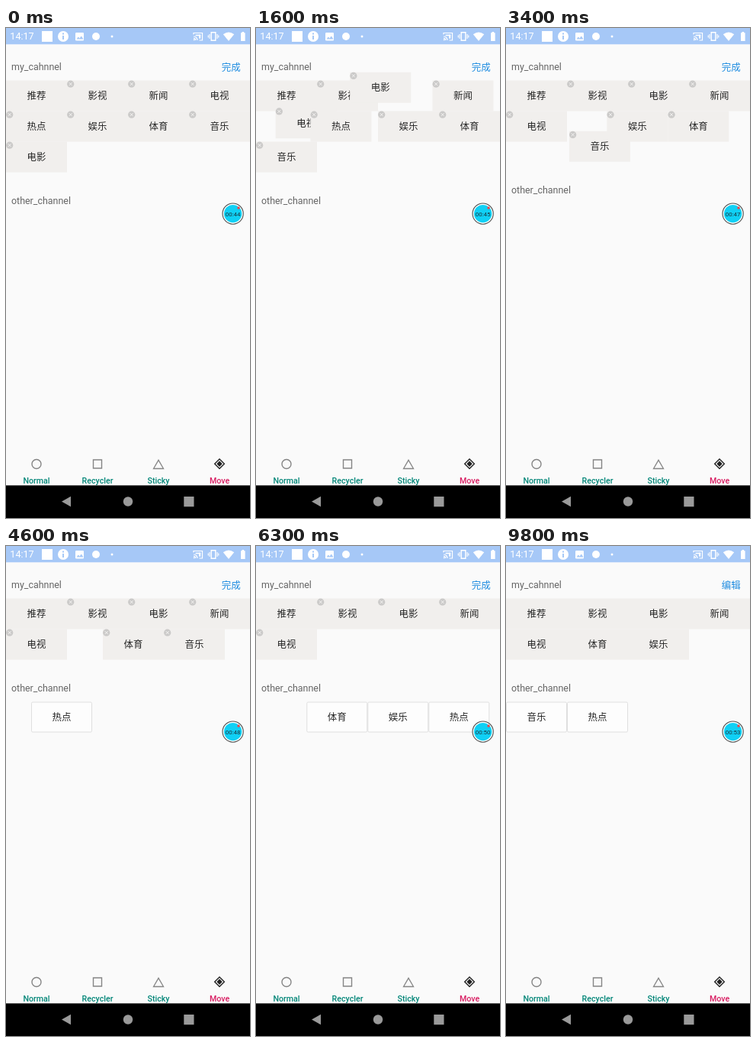
Animation of 320x640 px, one loop 9.9 s. Source, as an HTML page with a canvas:

```html
<!DOCTYPE html>
<html lang="zh-CN">
<head>
<meta charset="utf-8">
<title>Channel editor</title>
<style>
html, body { margin: 0; width: 100%; height: 100%; overflow: hidden; background: #fafafa; }
canvas { display: block; width: 320px; height: 640px; }
</style>
</head>
<body>
<canvas id="stage"></canvas>
<script>
const LOOP = 9900, MOVE = 250, FADE_IN = 120, FADE_OUT = 90, EDIT_END = 9500;
const CELL_W = 80, CELL_H = 40, GRID_TOP = 68.5;
const LATIN = 'Roboto, sans-serif';
const HAN = '"Noto Sans CJK SC", "Noto Sans CJK", sans-serif';

const canvas = document.getElementById('stage');
const ctx = canvas.getContext('2d');
const ratio = window.devicePixelRatio || 1;
canvas.width = 320 * ratio;
canvas.height = 640 * ratio;

// Each layout begins its slide at the given time.
const layouts = [
  [0, '推荐 影视 新闻 电视 热点 娱乐 体育 音乐 电影', ''],
  [738, '推荐 影视 新闻 电视 热点 电影 娱乐 体育 音乐', ''],
  [1404, '推荐 影视 电影 新闻 电视 热点 娱乐 体育 音乐', ''],
  [3301, '推荐 影视 电影 新闻 电视 娱乐 体育 音乐', '热点'],
  [4490, '推荐 影视 电影 新闻 电视 体育 音乐', '娱乐 热点'],
  [5400, '推荐 影视 电影 新闻 电视 音乐', '体育 娱乐 热点'],
  [6119, '推荐 影视 电影 新闻 电视', '音乐 体育 娱乐 热点'],
  [7700, '推荐 影视 电影 新闻 电视 体育', '音乐 娱乐 热点'],
  [8400, '推荐 影视 电影 新闻 电视 体育 娱乐', '音乐 热点']
].map(([at, mine, other]) => {
  const names = mine.split(' ');
  const rows = Math.ceil(names.length / 4);
  const cells = new Map();
  const place = (list, isMine, top) => list.forEach((name, i) =>
    cells.set(name, { isMine, x: i % 4 * CELL_W, y: top + Math.floor(i / 4) * CELL_H }));
  place(names, true, GRID_TOP);
  place(other.split(' ').filter(Boolean), false, 123.5 + rows * CELL_H);
  return { at, cells, labelY: 106 + rows * CELL_H };
});

const drag = { name: '电影', start: 100, release: 1550, end: 1800,
  from: { x: 0, y: 148.5 }, to: { x: 119.1, y: 56.5 }, home: { x: 160, y: GRID_TOP } };

const clamp = v => Math.max(0, Math.min(1, v));
const ease = v => 0.5 - Math.cos(Math.PI * clamp(v)) / 2;
const lerp = (a, b, p) => a + (b - a) * p;
const mix = (a, b, p) => ({ x: lerp(a.x, b.x, p), y: lerp(a.y, b.y, p) });

function text(str, x, y, size, color, family = LATIN, align = 'left', weight = 400) {
  ctx.font = `${weight} ${size}px ${family}`;
  ctx.textAlign = align;
  ctx.fillStyle = color;
  ctx.fillText(str, x, y);
}

function rect(x, y, w, h, color) {
  ctx.fillStyle = color;
  ctx.fillRect(x, y, w, h);
}

function paint(fill, stroke, width) {
  if (fill) { ctx.fillStyle = fill; ctx.fill(); }
  if (stroke) { ctx.strokeStyle = stroke; ctx.lineWidth = width; ctx.stroke(); }
}

function circle(x, y, r, fill, stroke, width = 1) {
  ctx.beginPath();
  ctx.arc(x, y, r, 0, Math.PI * 2);
  paint(fill, stroke, width);
}

function path(d, fill, stroke, width = 1) {
  const shape = new Path2D(d);
  if (fill) { ctx.fillStyle = fill; ctx.fill(shape); }
  if (stroke) { ctx.strokeStyle = stroke; ctx.lineWidth = width; ctx.stroke(shape); }
}

function closeIcon(x, y) {
  circle(x, y, 4.6, '#cbcac9');
  path(`M${x - 2} ${y - 2}l4 4m0 -4l-4 4`, null, '#f6f5f4', 0.9);
}

function tile(name, { x, y }, isMine, alpha, editing) {
  if (alpha <= 0) return;
  ctx.globalAlpha = alpha;
  if (isMine) {
    rect(x, y, CELL_W, CELL_H, '#f1efed');
  } else {
    ctx.beginPath();
    ctx.roundRect(x + 0.5, y + 0.5, CELL_W - 1, CELL_H - 1, 1.5);
    paint('#fdfdfd', '#dfdfdf', 1);
  }
  text(name, x + 40, y + 24.5, 12.44, '#262626', HAN, 'center');
  if (isMine && editing && name !== '推荐') closeIcon(x + 4.7, y + 4.7);
  ctx.globalAlpha = 1;
}

function dragPosition(t) {
  return t < drag.release
    ? mix(drag.from, drag.to, clamp((t - drag.start) / (drag.release - drag.start)))
    : mix(drag.to, drag.home, ease((t - drag.release) / (drag.end - drag.release)));
}

function channels(t) {
  const index = layouts.findLastIndex(layout => layout.at <= t);
  const now = layouts[index];
  const before = layouts[Math.max(0, index - 1)];
  const next = layouts[index + 1];
  const p = ease((t - now.at) / MOVE);
  const editing = t < EDIT_END;

  text('my_cahnnel', 7, 55.3, 12.44, '#666');
  text(editing ? '完成' : '编辑', 307.7, 55.7, 12.44, '#1e8ce0', HAN, 'right');
  text('other_channel', 7, lerp(before.labelY, now.labelY, p) + 4.3, 12.44, '#666');

  for (const [name, cell] of now.cells) {
    if (name === drag.name && t < drag.end) continue;
    const old = before.cells.get(name);
    const swapped = old.isMine !== cell.isMine;
    let alpha = swapped ? clamp((t - now.at - MOVE) / FADE_IN) : 1;
    if (next && next.cells.get(name).isMine !== cell.isMine)
      alpha *= clamp((next.at - t) / FADE_OUT);
    tile(name, swapped ? cell : mix(old, cell, p), cell.isMine, alpha, editing);
  }
  if (t < drag.end) tile(drag.name, dragPosition(t), true, 1, editing);
}

function statusBar() {
  const blue = '#a6c8f7', white = '#fff';
  rect(0, 0, 320, 21.3, blue);
  text('14:17', 5.3, 15.4, 12.6, white);
  rect(47, 4, 14, 14, white);
  circle(75, 11, 7, white);
  rect(74, 10, 2, 5, blue);
  rect(74, 6.5, 2, 2, blue);
  ctx.beginPath();
  ctx.roundRect(91, 6, 11, 10.5, 1.2);
  paint(white);
  path('M92.5 14.5l2.3 -3 1.7 2 2.2 -3 2.8 4z', blue);
  circle(118, 11, 5, white);
  circle(139, 11, 1.5, white);
  // cast, vibrate, wifi, battery
  path('M246 8.5v-2h11.5v9.5h-4M246 11a5 5 0 0 1 5 5M246 13.3a2.7 2.7 0 0 1 2.7 2.7', null, white, 1.2);
  rect(248.5, 8.7, 6.7, 1.6, white);
  rect(253, 8.7, 2.2, 5, white);
  circle(246.7, 15.4, 0.9, white);
  path('M269.2 5.8h5.6v10.4h-5.6z', null, white, 1.4);
  path('M267 8v6M277 8v6M265.2 9.5v3M278.8 9.5v3', null, white, 1.1);
  path('M284.8 8.2Q292 2.8 299.2 8.2L292 17z', white);
  path('M308 6.2h1.5v-1.3h2.6v1.3h1.5v10.8h-5.6z', white);
}

function bottomTabs() {
  const grey = '#858585', teal = '#008577', label = 10.67;
  circle(40, 569.5, 6, null, grey, 1.4);
  path('M114.5 564h11v11h-11z', null, grey, 1.4);
  path('M200 564.3l6.5 11.2h-13z', null, grey, 1.3);
  path('M280 563l6.3 6.3 -6.3 6.3 -6.3 -6.3z', null, '#222', 1.4);
  path('M280 565.6l3.7 3.7 -3.7 3.7 -3.7 -3.7z', '#222');
  ['Normal', 'Recycler', 'Sticky', 'Move'].forEach((name, i) =>
    text(name, 40 + i * 80, 594.8, label, name === 'Move' ? '#d81b60' : teal, LATIN, 'center', 500));

  rect(0, 597.4, 320, 43, '#000');
  path('M73 618.5L85 611.7V625.3z', '#9a9a9a');
  circle(160, 618.5, 6.2, '#9a9a9a');
  rect(233.3, 612, 13.2, 13.2, '#9a9a9a');
}

function recordTimer(t) {
  const seconds = 44 + Math.max(0, Math.floor((t - 100) / 1000));
  circle(297.6, 242.6, 13.6, '#fff', '#4c4c4c', 1.1);
  circle(297.6, 242.6, 11.7, '#10d0f5');
  text('00:' + seconds, 297.6, 245.5, 7.9, '#17323c', LATIN, 'center');
  circle(305, 235, 1.8, '#e8484e');
}

function frame() {
  const t = performance.now() % LOOP;
  ctx.setTransform(ratio, 0, 0, ratio, 0, 0);
  rect(0, 0, 320, 640, '#fafafa');
  channels(t);
  statusBar();
  bottomTabs();
  recordTimer(t);
  requestAnimationFrame(frame);
}
frame();
</script>
</body>
</html>
```
